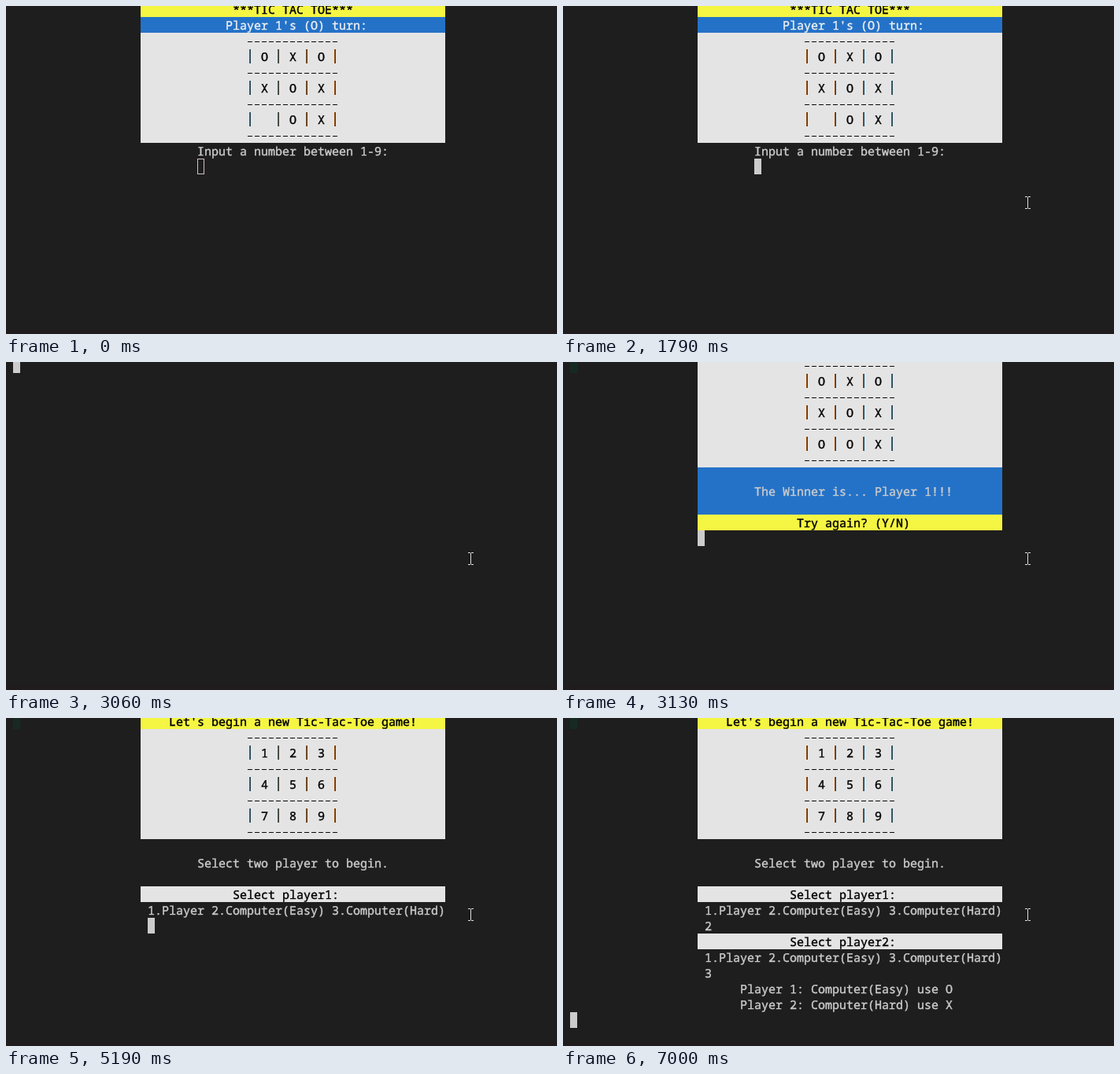
Write an HTML page that moves like this. It is 700 px wide and 417 px high and loops after 8 s.

```html
<!DOCTYPE html>
<html lang="en">
<head>
<meta charset="utf-8">
<title>Tic-tac-toe terminal</title>
<style>
html, body { margin: 0; width: 100%; height: 100%; overflow: hidden; background: #1e1e1e; }
svg { display: block; width: 100%; height: 100%; }
text { font: 15px "Noto Sans Mono", "DejaVu Sans Mono", monospace; white-space: pre; text-rendering: geometricPrecision; stroke-width: .4; }
</style>
</head>
<body>
<svg id="stage" viewBox="0 0 700 417"></svg>
<script>
const LOOP = 8000;
const CELL = 9, LINE = 20;
const YELLOW = '#f5f543', BLUE = '#2472c8', GREY = '#e4e4e4', LIGHT = '#cccccc';
const stage = document.getElementById('stage');

// Terminal grid to pixels; the top row is cut off by the stage edge.
const px = col => 9 + col * CELL;
const py = row => row * LINE - 6;

const rect = (x, y, w, h, fill) => `<rect x="${x}" y="${y}" width="${w}" height="${h}" fill="${fill}"/>`;
const band = (row, rows, fill) => rect(px(18), py(row), 43 * CELL, rows * LINE, fill);
const write = (col, row, text, fill = LIGHT) =>
  `<text x="${px(col)}" y="${py(row) + 16}" fill="${fill}" stroke="${fill}">${text}</text>`;
const block = (col, row) => rect(px(col), py(row), CELL, LINE, LIGHT);
const hollow = (col, row) =>
  `<rect x="${px(col) + .5}" y="${py(row) + .5}" width="8" height="19" fill="none" stroke="#d2c0c0"/>`;

// Bars carry the warm and cool edges of subpixel text.
const bar = (col, row) =>
  rect(px(col) + 3, py(row) + 1, 1, 18, '#964a08') + rect(px(col) + 4, py(row) + 1, 1, 18, '#1c4a62');

const dashes = (col, row) =>
  `<path d="M${px(col) + 1} ${py(row) + 11.5}h115" stroke="#000" stroke-dasharray="6 3"/>`;

function board(row, marks) {
  let out = dashes(33, row);
  for (let r = 0; r < 3; r++) {
    const line = row + 1 + r * 2;
    for (let c = 0; c < 4; c++) out += bar(33 + c * 4, line);
    for (let c = 0; c < 3; c++) out += write(35 + c * 4, line, marks[r * 3 + c], '#000');
    out += dashes(33, line + 1);
  }
  return out;
}

const ghost = () => rect(9, 0, CELL, 14, '#162a23');

const turn = () =>
  band(0, 1, YELLOW) + write(31, 0, '***TIC TAC TOE***', '#000') +
  band(1, 1, BLUE) + write(30, 1, "Player 1's (O) turn:", '#f0f0f0') +
  band(2, 7, GREY) + board(2, 'OXOXOX OX') +
  write(26, 9, 'Input a number between 1-9:');

const winner = () =>
  ghost() + band(0, 7, GREY) + board(0, 'OXOXOXOOX') +
  band(7, 3, BLUE) + write(26, 8, 'The Winner is... Player 1!!!') +
  band(10, 1, YELLOW) + write(32, 10, 'Try again? (Y/N)', '#000');

const choose = (n, row) =>
  band(row, 1, GREY) + write(31, row, `Select player${n}:`, '#000') +
  write(19, row + 1, '1.Player 2.Computer(Easy) 3.Computer(Hard)');

const setup = () =>
  ghost() + band(0, 1, YELLOW) + write(22, 0, "Let's begin a new Tic-Tac-Toe game!", '#000') +
  band(1, 7, GREY) + board(1, '123456789') +
  write(26, 9, 'Select two player to begin.') + choose(1, 11);

const first = () => setup() + write(19, 13, '2');
const second = () => first() + choose(2, 14);
const both = () => second() + write(19, 16, '3');
const summary = () => both() +
  write(24, 17, 'Player 1: Computer(Easy) use O') +
  write(24, 18, 'Player 2: Computer(Hard) use X');

// Each step holds until the next start time.
const steps = [
  [0, () => turn() + hollow(26, 10)],
  [1590, () => turn() + block(26, 10)],
  [2980, () => turn() + write(26, 10, '7') + block(27, 10)],
  [3060, () => block(0, 0)],
  [3130, () => winner() + block(18, 11)],
  [4660, () => winner() + write(18, 11, 'y') + block(19, 11)],
  [5190, () => setup() + block(19, 13)],
  [6380, () => first() + block(20, 13)],
  [6450, () => first() + block(0, 14)],
  [6520, () => second() + block(19, 16)],
  [6870, () => both() + block(20, 16)],
  [6940, () => both() + block(0, 17)],
  [7000, () => summary() + block(0, 19)]
];

function pointer(t) {
  if (t < 1200) return '';
  const x = t < 1260 ? 659.5 : t < 1320 ? 610.5 : 590.5;
  const click = t >= 1520 && t < 1790
    ? '<circle cx="588" cy="249" r="15" fill="#ff0" fill-opacity=".47"/>' : '';
  return click +
    `<path d="M${x - 3.5} 242.5h3m1 0h3M${x - 3.5} 257.5h3m1 0h3M${x} 243v14" fill="none" stroke="#dedede"/>`;
}

let shown = '';
function draw(t) {
  const step = steps.filter(([start]) => start <= t).pop();
  const picture = rect(0, 0, 700, 417, '#1e1e1e') + rect(0, 412, 700, 5, '#201c1d') + step[1]() + pointer(t);
  if (picture !== shown) stage.innerHTML = shown = picture;
}

const began = performance.now();
function tick() {
  draw((performance.now() - began) % LOOP);
  requestAnimationFrame(tick);
}
tick();
</script>
</body>
</html>
```
